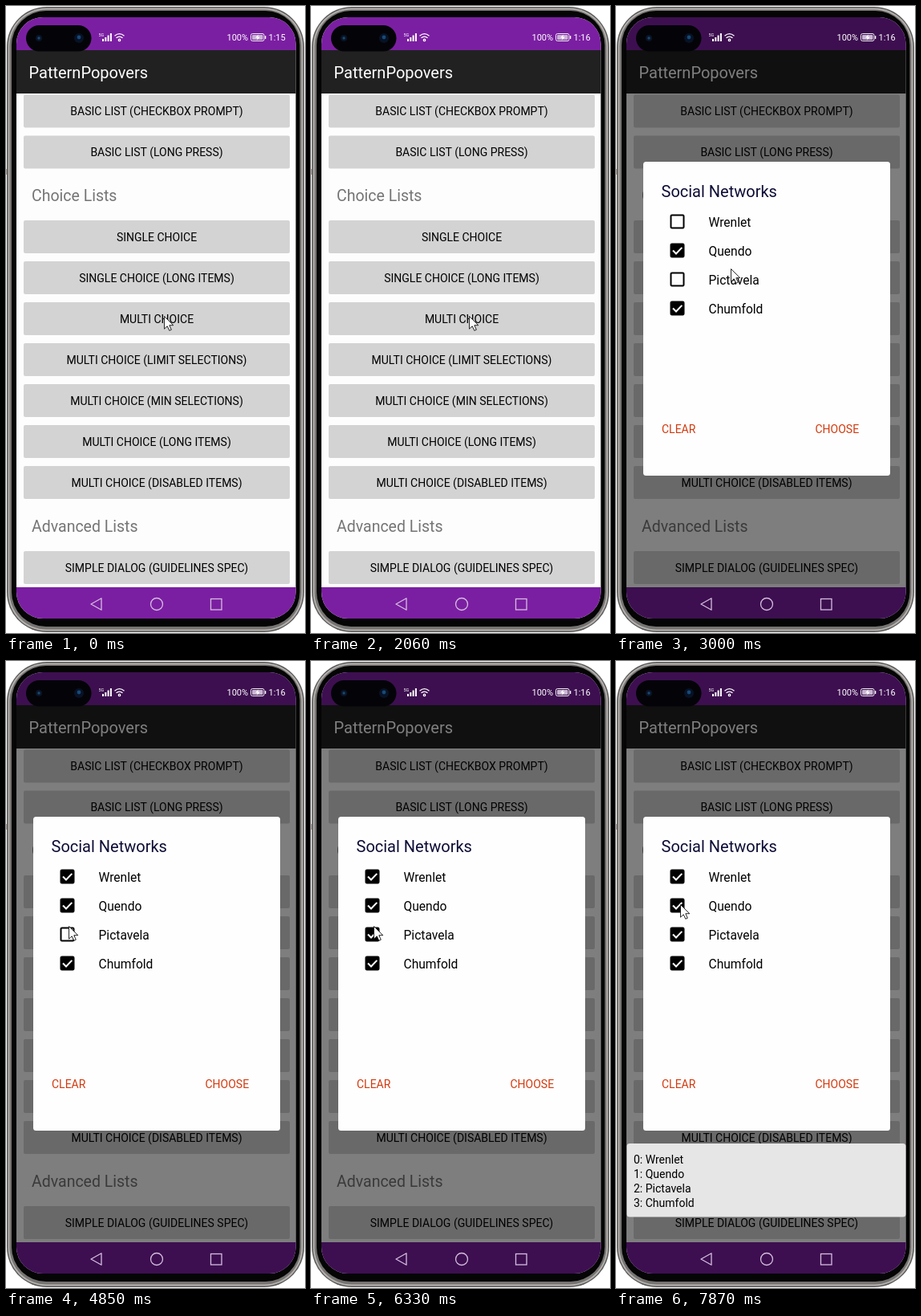
Recreate the animation shown at these times as an HTML page. Size 373 by 781 pixels, loop 7990 ms.

```html
<!DOCTYPE html>
<html lang="en">
<head>
<meta charset="utf-8">
<title>Multi choice dialog</title>
<style>
  html, body { margin: 0; width: 100%; height: 100%; overflow: hidden; background: #fff; }
  svg { display: block; width: 100vw; height: 100vh; font: 14px Roboto, "Open Sans", sans-serif; }
  .title { font-size: 20px; }
  .heading { font-size: 19.5px; fill: #757575; }
  .item { font-size: 15.6px; }
  .action { fill: #d23a0e; }
  .status { font-size: 11px; fill: #fff; }
</style>
</head>
<body>
<svg viewBox="0 0 373 781">
  <defs>
    <clipPath id="screen"><rect x="13" y="14" width="348.5" height="749" rx="33"/></clipPath>
  </defs>

  <g id="phone">
    <rect y="203" width="3" height="7" fill="#b9aaa0"/>
    <rect x="1" y="1" width="371" height="779" rx="50" fill="#555"/>
    <rect x="2.5" y="2.5" width="368" height="776" rx="48" fill="#b3afac"/>
    <rect x="4.5" y="4.5" width="364" height="772" rx="46" fill="#767472"/>
    <rect x="7" y="6" width="359.5" height="767" rx="43" fill="#050505"/>
  </g>

  <g clip-path="url(#screen)">
    <rect x="13" y="14" width="349" height="750" fill="#fdfdfd"/>
    <g id="list"></g>
    <rect x="13" y="55" width="349" height="54" fill="#212121"/>
    <text class="title" x="28.5" y="90" fill="#fff">PatternPopovers</text>
    <rect x="13" y="14" width="349" height="41" fill="#7b1fa2"/>
    <rect x="13" y="724" width="349" height="40" fill="#7b1fa2"/>
    <rect id="dim" x="13" y="14" width="349" height="750" opacity=".5"/>
  </g>

  <g id="camera">
    <rect x="25" y="24" width="81.5" height="32.5" rx="16.2" fill="#040408"/>
    <circle cx="41" cy="40" r="4" fill="#0a1428"/>
    <circle cx="41" cy="40" r="1.7" fill="#174a70"/>
    <circle cx="91" cy="40" r="6" fill="#081226"/>
    <circle cx="91" cy="39" r="2.4" fill="#164a78"/>
  </g>

  <g id="statusIcons" fill="#fff">
    <text x="115.5" y="38" font-size="5.5">5G</text>
    <path d="M120 41h2v3h-2zM123.3 39h2v5h-2zM126.6 36.5h2v7.5h-2zM129.9 34h2v10h-2z"/>
    <g fill="none" stroke="#fff" stroke-width="1.3">
      <path d="M135.5 37.2q6-5 12 0M137.5 39.8q4-3.4 8 0"/>
      <circle cx="141.5" cy="42.4" r="1.2"/>
    </g>
    <text class="status" x="275.5" y="43">100%</text>
    <rect x="305.5" y="34.5" width="16.5" height="9" rx="2" fill="none" stroke="#eee"/>
    <rect x="307" y="36" width="13.5" height="6" rx="1" fill="#c9b4d3"/>
    <path d="M315 35.5l-4 4h2.6l-.8 3.2 4-4.2h-2.6z"/>
    <rect x="323" y="37" width="1.3" height="4" rx=".6"/>
    <text class="status" id="clock" x="327.5" y="43"></text>
  </g>

  <g fill="none" stroke="#d5bddf" stroke-width="1.3">
    <path d="M106 745l13-7.3v14.6z" stroke-linejoin="round"/>
    <circle cx="188" cy="745" r="7.5"/>
    <rect x="255.5" y="738.5" width="13.5" height="13.5"/>
  </g>

  <g id="dialog">
    <rect x="34" y="194" width="308" height="391" rx="3.5" fill="#fefefe"/>
    <text class="title" x="56.5" y="238" fill="#0c0c36">Social Networks</text>
    <g id="choices"></g>
    <text class="action" x="57" y="532">CLEAR</text>
    <text class="action" x="248.5" y="532">CHOOSE</text>
  </g>

  <g id="toast">
    <rect x="13.5" y="601" width="348" height="91.5" rx="3.5" fill="#e6e6e6"/>
  </g>

  <path id="cursor" d="M.5 .5V16.2L4.2 12.8 6.8 18.3 9.3 17.2 6.8 11.7H11.8Z"
        fill="#fff" stroke="#111" stroke-width=".9" stroke-linejoin="round"/>
</svg>

<script>
const LOOP = 7990;
const DIALOG_AT = 2180;
const TOAST_AT = 6480;

const buttons = [
  [131, "BASIC LIST (CHECKBOX PROMPT)"],
  [182, "BASIC LIST (LONG PRESS)"],
  [287.5, "SINGLE CHOICE"],
  [338.5, "SINGLE CHOICE (LONG ITEMS)"],
  [389.5, "MULTI CHOICE"],
  [440.5, "MULTI CHOICE (LIMIT SELECTIONS)"],
  [491.5, "MULTI CHOICE (MIN SELECTIONS)"],
  [542.5, "MULTI CHOICE (LONG ITEMS)"],
  [593.5, "MULTI CHOICE (DISABLED ITEMS)"],
  [699.5, "SIMPLE DIALOG (GUIDELINES SPEC)"]
];
const headings = [[243, "Choice Lists"], [655, "Advanced Lists"]];

// Each choice turns on at its time.
const choices = [["Wrenlet", 4340], ["Quendo", 0], ["Pictavela", 5390], ["Chumfold", 0]];

// Pointer positions, held until the next time.
const pointer = [
  [0, 197, 386], [3000, 143, 327], [3130, 113, 298], [3260, 95, 281],
  [3400, 85, 272], [3530, 80, 268], [3660, 78, 266],
  [4600, 78, 288], [4730, 78, 316], [4850, 78, 330],
  [6750, 79, 322], [6880, 79, 312], [7020, 80, 306], [7180, 80, 303]
];

const $ = id => document.getElementById(id);

function add(parent, tag, attrs, text = "") {
  const node = document.createElementNS("http://www.w3.org/2000/svg", tag);
  for (const key in attrs) node.setAttribute(key, attrs[key]);
  node.textContent = text;
  return parent.appendChild(node);
}

for (const [y, label] of buttons) {
  add($("list"), "rect", { x: 22, y: y - 20.5, width: 332, height: 41, rx: 2, fill: "#d3d3d3" });
  add($("list"), "text", { x: 188, y: y + 5, "text-anchor": "middle" }, label);
}
for (const [y, label] of headings) add($("list"), "text", { x: 32, y, class: "heading" }, label);

const boxes = choices.map(([label], i) => {
  const y = 268.5 + 36 * i;
  const box = add($("choices"), "rect",
    { x: 68.5, y: y - 8, width: 16, height: 16, rx: 1.2, stroke: "#000", "stroke-width": 2 });
  const tick = add($("choices"), "path",
    { d: `M71 ${y}l4 4 7.3-7.6`, fill: "none", stroke: "#fff", "stroke-width": 2 });
  add($("choices"), "text", { x: 115.5, y: y + 6.5, class: "item" }, label);
  add($("toast"), "text", { x: 22, y: 626 + 18 * i }, `${i}: ${label}`);
  return { box, tick };
});

function show(node, visible) {
  node.setAttribute("visibility", visible ? "visible" : "hidden");
}

function draw(t) {
  $("clock").textContent = t < 820 ? "1:15" : "1:16";
  const open = t >= DIALOG_AT;
  $("dim").setAttribute("opacity", open ? 0.5 : 0);
  $("dialog").setAttribute("display", open ? "inline" : "none");
  boxes.forEach(({ box, tick }, i) => {
    const checked = t >= choices[i][1];
    box.setAttribute("fill", checked ? "#000" : "none");
    show(tick, checked);
  });
  $("toast").setAttribute("opacity", Math.min(1, Math.max(0, (t - TOAST_AT) / 250)));
  const [, x, y] = pointer.filter(([start]) => t >= start).pop();
  $("cursor").setAttribute("transform", `translate(${x} ${y})`);
}

const start = performance.now();
function tick() {
  draw((performance.now() - start) % LOOP);
  requestAnimationFrame(tick);
}
tick();
</script>
</body>
</html>
```
